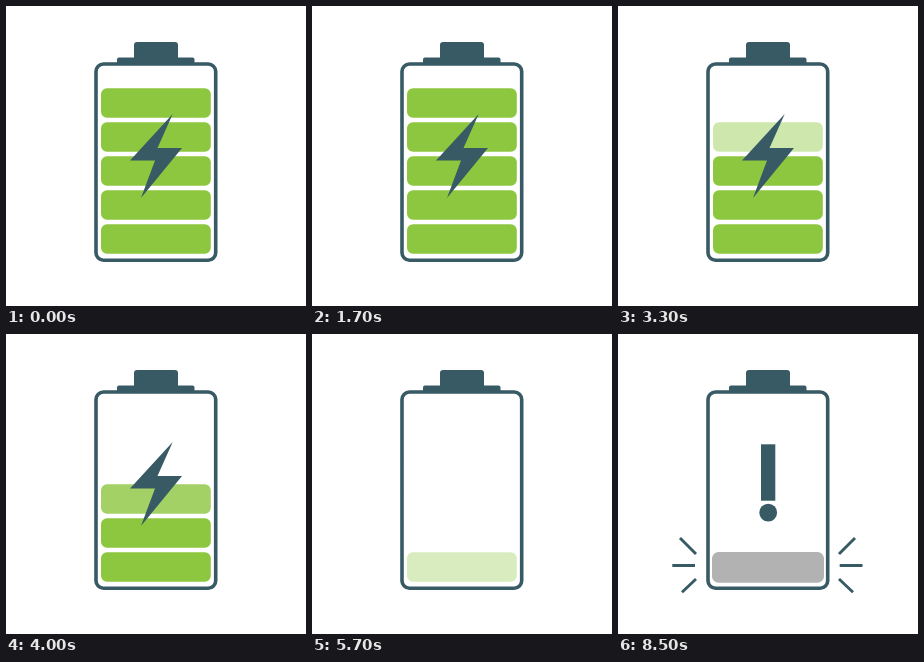
These frames come from a looping animation (300x300 px, 9 s). An HTML page:

```html
<!DOCTYPE html>
<html lang="en">
<head>
<meta charset="utf-8">
<title>Battery running down</title>
<style>
html, body { margin: 0; width: 100%; height: 100%; overflow: hidden; background: #fff; }
svg { display: block; width: 100vw; height: 100vh; }
</style>
</head>
<body>
<svg viewBox="0 0 300 300" fill="#375a64">
  <rect x="128" y="36" width="44" height="20" rx="3"/>
  <rect x="111" y="51.5" width="77.5" height="8" rx="2"/>
  <rect x="90" y="58" width="119.7" height="196.2" rx="7.5" fill="#fff" stroke="#375a64" stroke-width="3.6"/>
  <g id="bars" fill="#8dc63f"></g>
  <path id="bolt" d="M166.7 108 L124 154.5 H149 L135 192 L176 142 H151.5 Z"/>
  <g id="alert">
    <rect x="94" y="218" width="112" height="30.7" rx="6.5" fill="#b2b2b2"/>
    <rect x="143" y="110.3" width="14.3" height="56.4"/>
    <circle cx="150.2" cy="178.6" r="8.9"/>
  </g>
  <path id="rays" fill="none" stroke="#375a64" stroke-width="2.9"
    d="M62 204 L78 220 M54.3 231.5 H77 M64 258.3 L78 245 M237 204 L221 220 M221.7 231.5 H244.5 M235 258.3 L221 245"/>
</svg>
<script>
const $ = id => document.getElementById(id);
const LOOP = 9000, STEP = 100;

// Opacity tracks as [time, value] points, linear in between
const barTracks = [
  [[100, 1], [1000, 0], [1700, 1], [2400, 0]],
  [[2900, 1], [3600, 0]],
  [[3900, 1], [4400, 0]],
  [[4700, 1], [5100, 0]],
  [[5300, 1], [5900, 0]]
];
const rayTrack = [[7400, 0], [7700, 1], [8100, 0], [8500, 1]];

const bars = barTracks.map((_, i) => {
  const bar = document.createElementNS('http://www.w3.org/2000/svg', 'rect');
  const box = { x: 95, y: 82.2 + 34 * i, width: 109.8, height: 29.6, rx: 6 };
  for (const key in box) bar.setAttribute(key, box[key]);
  return $('bars').appendChild(bar);
});

function valueAt(track, t) {
  const next = track.findIndex(point => t < point[0]);
  if (next < 0) return track[track.length - 1][1];
  if (next === 0) return track[0][1];
  const [t0, v0] = track[next - 1], [t1, v1] = track[next];
  return v0 + (v1 - v0) * (t - t0) / (t1 - t0);
}

function draw(now) {
  const t = Math.floor(now % LOOP / STEP) * STEP;
  bars.forEach((bar, i) => bar.style.opacity = valueAt(barTracks[i], t));
  $('bolt').style.opacity = t < 5400 ? 1 : 0;
  $('alert').style.opacity = t < 6400 ? 0 : 1;
  $('rays').style.opacity = valueAt(rayTrack, t);
}

const start = performance.now();
function tick() {
  draw(performance.now() - start);
  requestAnimationFrame(tick);
}
tick();
</script>
</body>
</html>
```
